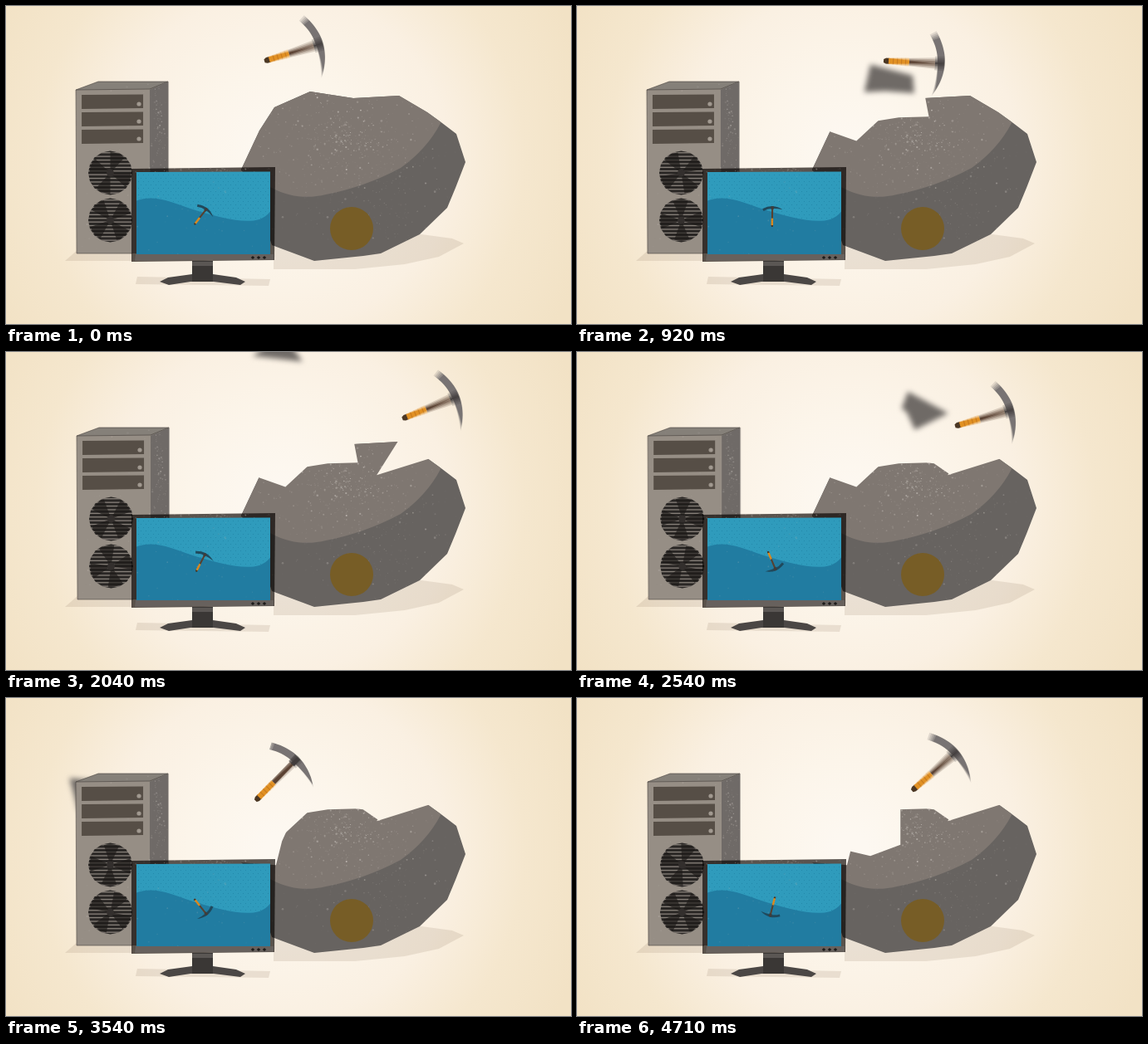
Animation, 680 px wide and 383 px high, one loop 4750 ms. Source, as an HTML page with a canvas:

```html
<!DOCTYPE html>
<html lang="en">
<head>
<meta charset="utf-8">
<title>Mining</title>
<style>
html, body { margin: 0; width: 100%; height: 100%; overflow: hidden; background: #f4e5ca; }
canvas { display: block; width: 680px; height: 383px; }
</style>
</head>
<body>
<canvas id="stage" width="680" height="383"></canvas>
<script>
const W = 680, H = 383, LOOP = 4750, STEPS = 114;
const ctx = document.getElementById('stage').getContext('2d');

let seed = 11;
const rnd = () => (seed = (seed * 16807) % 2147483647) / 2147483647;

function layer() {
  const c = document.createElement('canvas');
  c.width = W; c.height = H;
  return c.getContext('2d');
}

const path = d => new Path2D(d);
function fill(g, color, d) {
  g.fillStyle = color;
  g.fill(typeof d === 'string' ? path(d) : d);
}
function disc(g, color, x, y, r) {
  g.fillStyle = color;
  g.beginPath();
  g.arc(x, y, r, 0, 7);
  g.fill();
}

// pale grit inside a box, denser around its middle
function grit(g, n, x, y, w, h, alpha) {
  const spread = dense => dense ? (rnd() + rnd() + rnd()) / 3 : rnd();
  for (let i = 0; i < n; i++) {
    const r = 0.3 + rnd() * rnd() * 1.1, tone = alpha * rnd();
    disc(g, `rgba(200,194,188,${tone})`, x + spread(i % 2) * w, y + spread(i % 2) * h, r);
  }
}

// each strike: time and place of the grip
const strikes = [
  [-155, 312, 66], [310, 312, 66], [830, 370, 66], [1350, 426, 70], [1870, 478, 80],
  [2390, 456, 89], [2830, 380, 95], [3285, 301, 123], [3950, 338, 88], [4470, 404, 111],
  [4990, 404, 111]
];

// pieces of rock: outline, strike that frees it, velocity
const chunks = [
  ['M305 150L323 122 366 103 362 137 336 161Z', 1, -0.5, -0.3],
  ['M366 103L418 111 422 132 387 133 362 137Z', 2, -0.11, -0.22],
  ['M473 108L507 128 449 146Z', 4, -0.4, -0.35],
  ['M418 111L473 108 449 146 430 133 422 132Z', 5, -0.1, -0.18],
  ['M283 197L305 150 336 161 331 172 324 200Z', 7, -0.3, -0.08],
  ['M336 161L362 137 388 133 388 176 353 189 328 183 331 172Z', 9, -0.8, -0.25]
].map(([d, strike, vx, vy], i) => {
  const n = d.match(/\d+/g).map(Number), k = n.length / 2;
  const mean = o => n.reduce((s, v, j) => j % 2 === o ? s + v : s, 0) / k;
  return { shape: path(d), hit: strikes[strike][0], vx, vy, spin: 0.0012 * i, cx: mean(0), cy: mean(1) };
});

const ROCK = 'M283 197L305 150 323 122 366 103 418 111 473 108 507 128 525 141 542 154 ' +
  '553 188 541 219 531 243 498 275 451 298 430 301 371 307 320 288 300 230Z';
const BEZEL = path('M151 196L324 194 323 306 151 308Z');
const HEAD = path('M-13 -31L-5 -35Q5 -17 5 0Q4 20 -7 36Q-3 16 -4 0Q-4 -17 -13 -31Z');

function paintBackdrop(g) {
  const glow = g.createRadialGradient(330, 185, 20, 330, 185, 385);
  ['#fdf8f1', '#fcf5ea', '#faf0e2', '#f5e7ce', '#f2e2c5'].forEach((c, i) => glow.addColorStop(i / 4, c));
  g.fillStyle = glow;
  g.fillRect(0, 0, W, H);
  const shade = 'rgba(150,130,108,.18)';
  fill(g, shade, 'M322 290L500 275 537 280 551 286 521 302 480 311 420 317 322 317Z');
  fill(g, shade, 'M71 307L87 293 152 293V307Z');
  fill(g, shade, 'M158 326L318 329 316 337 156 335Z');
}

function paintRock(g) {
  g.save();
  g.clip(path(ROCK));
  g.fillStyle = '#676360';
  g.fillRect(270, 90, 300, 230);
  fill(g, '#7f7771', 'M270 90H540L523 141Q507 172 475 195Q432 218 385 227C365 232 342 231 320 219L270 200Z');
  grit(g, 420, 300, 105, 225, 115, 0.5);
  grit(g, 150, 370, 105, 75, 95, 0.9);
  grit(g, 320, 320, 160, 230, 145, 0.3);
  g.restore();
  disc(g, '#775d26', 416, 268, 26);
}

function paintTower(g) {
  fill(g, '#6f6a67', 'M173 100L195.5 91V200H173Z');
  fill(g, '#858079', 'M84 101L111 91 195.5 91 173 101Z');
  fill(g, '#968e85', 'M84 101L173 100V298H85Z');
  grit(g, 130, 174, 93, 20, 102, 0.5);
  grit(g, 150, 86, 93, 86, 204, 0.35);
  g.strokeStyle = 'rgba(70,64,60,.6)';
  g.stroke(path('M85 298L84 101 111 91 195 91M84 101L173 100 195 91M85 298H152'));
  for (let y = 107; y < 150; y += 21) {
    fill(g, '#564e46', `M91 ${y}L165 ${y - 0.5}V${y + 16}L91 ${y + 17}Z`);
    disc(g, '#a19990', 160, y + 11, 2.6);
  }
}

function paintMonitor(g) {
  fill(g, '#4b4745', 'M195 327L224 323H249L277 327 288 332 282 336 250 332H222L196 336 185 332Z');
  fill(g, '#3a3735', 'M224 307H249V332H224Z');
  fill(g, '#5b5754', 'M224 308H249V313H224Z');
  fill(g, '#67615d', 'M156 299H322V305.5L155 307Z');
  grit(g, 70, 153, 195, 169, 5, 0.35);
  g.save();
  g.clip(path('M157 200L318 199.5V299H157Z'));
  g.fillStyle = '#2f9bbc';
  g.fillRect(155, 198, 165, 103);
  g.fillStyle = 'rgba(18,105,140,.35)';
  for (let y = 203, row = 0; y < 258; y += 4, row++)
    for (let x = 159 + row % 2 * 3; x < 318; x += 6) g.fillRect(x, y, 1, 1);
  fill(g, '#217ca1', 'M156 235C178 226 200 237 222 244C250 253 285 263 305 257Q315 253 319 246V300H156Z');
  grit(g, 60, 157, 200, 160, 99, 0.2);
  g.restore();
  for (let x = 297; x < 312; x += 7)
    fill(g, '#1d1b1a', `M${x - 2.2} 303L${x} 301 ${x + 2.2} 303 ${x} 305Z`);
}

function drawFan(x, y, turn) {
  const g = ctx;
  g.save();
  g.translate(x, y);
  g.beginPath();
  for (let a = 0; a < 6.2; a += Math.PI / 8) g.lineTo(26.5 * Math.cos(a), 26.5 * Math.sin(a));
  g.clip();
  g.fillStyle = '#88817a';
  g.fillRect(-28, -28, 56, 56);
  g.fillStyle = '#2a2725';
  for (let i = -28; i < 28; i += 4.4) g.fillRect(-28, i, 56, 3.1);
  g.rotate(turn);
  g.fillStyle = 'rgba(28,25,24,.65)';
  for (let a = 0; a < 6; a += Math.PI / 2) {
    g.beginPath();
    g.moveTo(0, 0);
    g.arc(0, 0, 25, a, a + 0.75);
    g.fill();
  }
  disc(g, '#332f2d', 0, 0, 4.5);
  g.restore();
}

// offset shifts the pick along its handle, away from the pivot
function drawPick(g, x, y, deg, scale, metal, offset) {
  g.save();
  g.translate(x, y);
  g.rotate(deg * Math.PI / 180);
  g.scale(scale, scale);
  g.translate(offset, 0);
  fill(g, '#493522', 'M-69 -2L-66 -3.5H-62V3.5H-66L-69 2Z');
  fill(g, '#e08d21', 'M-63 -3.5H-38V3.5H-63Z');
  g.fillStyle = '#c67a1d';
  for (let i = -58; i < -40; i += 5) g.fillRect(i, -3.5, 1.2, 7);
  fill(g, '#57402f', 'M-38 -3H-4V3H-38Z');
  fill(g, metal, HEAD);
  fill(g, '#413c39', 'M-7 -4.5H4V4.5H-7Z');
  g.restore();
}

// the grip waits while the pick rises, then glides to the next strike
function swing(g, t) {
  const i = Math.max(1, strikes.findIndex(s => s[0] > t));
  const [t0, x0, y0] = strikes[i - 1], [t1, x1, y1] = strikes[i];
  const raise = Math.min(t - t0, t1 - t, 255);
  const u = Math.max(0, 2 * (t - t0) / (t1 - t0) - 1), e = u * u * (3 - 2 * u);
  drawPick(g, x0 + (x1 - x0) * e, y0 + (y1 - y0) * e, 28 - 0.29 * raise, 1, '#777370', 68);
}

const [backdrop, rock, tower, monitor, cut, once, blur] = Array.from({ length: 7 }, layer);
paintBackdrop(backdrop);
paintRock(rock);
paintTower(tower);
paintMonitor(monitor);

// averages a drawing over a short shutter time
function smear(t, shutter, draw) {
  const n = 5;
  blur.globalCompositeOperation = 'source-over';
  blur.clearRect(0, 0, W, H);
  blur.globalCompositeOperation = 'lighter';
  blur.globalAlpha = 1 / n;
  for (let i = 0; i < n; i++) {
    once.clearRect(0, 0, W, H);
    draw(once, t + (i / (n - 1) - 0.5) * shutter);
    blur.drawImage(once.canvas, 0, 0);
  }
  blur.globalAlpha = 1;
  ctx.drawImage(blur.canvas, 0, 0);
}

function drawRock(t) {
  cut.globalCompositeOperation = 'copy';
  cut.drawImage(rock.canvas, 0, 0);
  cut.globalCompositeOperation = 'destination-out';
  cut.lineWidth = 2.5;
  for (const c of chunks) if (t >= c.hit) {
    cut.fill(c.shape);
    cut.stroke(c.shape);
  }
  ctx.drawImage(cut.canvas, 0, 0);
}

function drawChunk(c, age) {
  const d = age * (1 + age / 150);
  ctx.save();
  ctx.filter = 'blur(3px)';
  ctx.translate(c.cx + c.vx * d, c.cy + c.vy * d);
  ctx.rotate(c.spin * age);
  ctx.translate(-c.cx, -c.cy);
  fill(ctx, '#6f6a66', c.shape);
  ctx.restore();
}

function render(time) {
  const n = Math.round(time / LOOP * STEPS) % STEPS, t = n * LOOP / STEPS;
  ctx.drawImage(backdrop.canvas, 0, 0);
  drawRock(t);
  for (const c of chunks) if (t >= c.hit && t < c.hit + 600) drawChunk(c, t - c.hit);

  const shake = 0.6 + 0.7 * Math.sin(n * 1.7 - 1);
  ctx.drawImage(tower.canvas, shake, 0);
  drawFan(125.5 + shake, 201, t * 0.011);
  drawFan(125.5 + shake, 258, t * 0.011 + 0.5);

  ctx.globalCompositeOperation = 'multiply';
  fill(ctx, '#5b5653', BEZEL);
  ctx.globalCompositeOperation = 'source-over';
  ctx.drawImage(monitor.canvas, 0, 0);

  const turn = (t - 920) / 1040;
  const deg = 360 * turn - 24 * (1 - Math.cos(turn * 2 * Math.PI));
  drawPick(ctx, 235, 252.5, deg - 88, 0.34, '#20495c', 29);
  smear(t, 24, swing);
}

const start = performance.now();
function tick() {
  render((performance.now() - start) % LOOP);
  requestAnimationFrame(tick);
}
tick();
</script>
</body>
</html>
```
